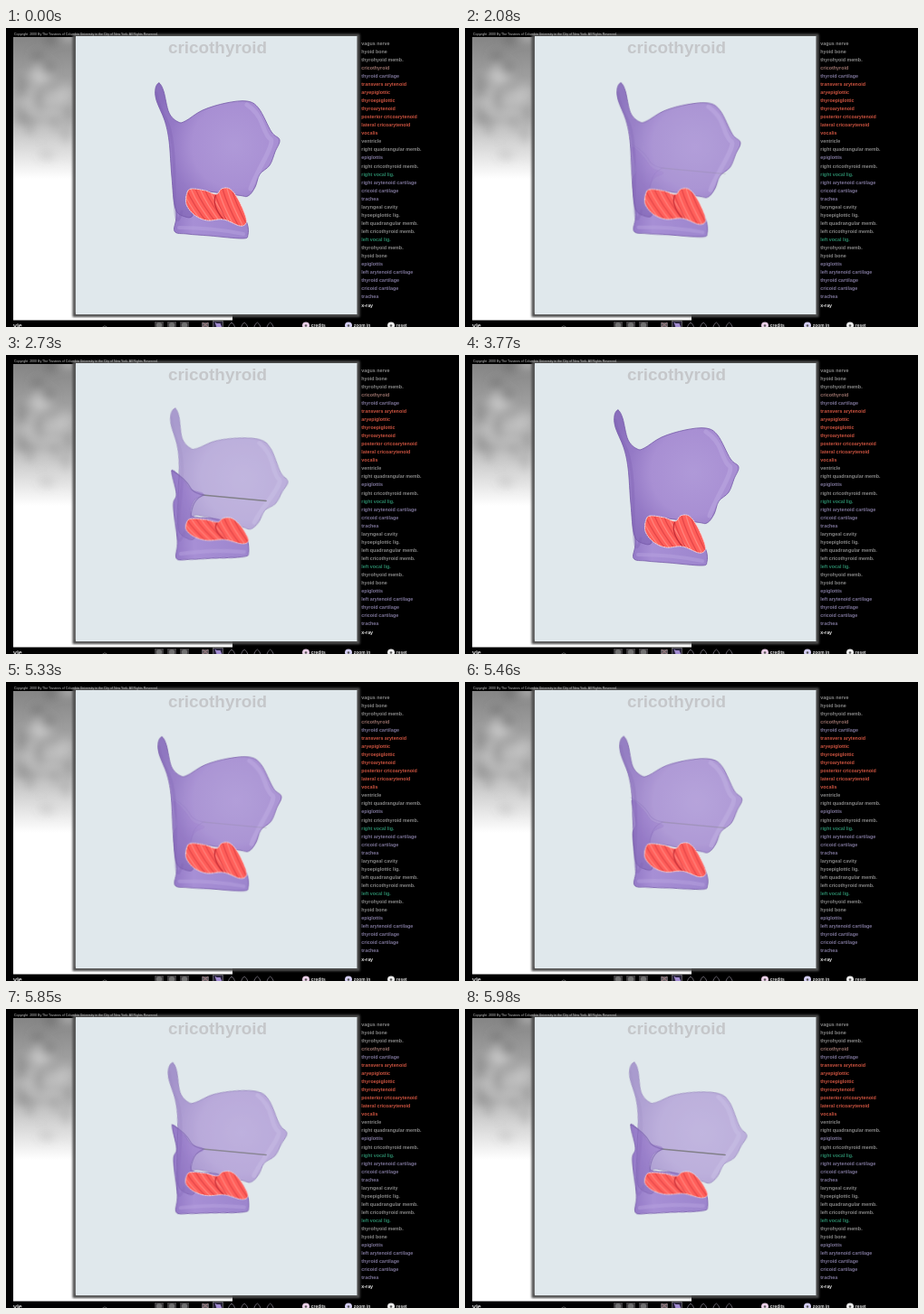
These frames come from a looping animation (500 px wide and 331 px high, 7670 ms). An HTML page:

```html
<!DOCTYPE html>
<html lang="en">
<head>
<meta charset="utf-8">
<title>cricothyroid</title>
<style>
  html, body { margin: 0; width: 100%; height: 100%; overflow: hidden; background: #000; }
  svg { display: block; width: 500px; height: 331px; }
  text { font-family: "Liberation Sans", Arial, sans-serif; font-weight: bold; white-space: pre; }
  #larynx { fill: none; stroke-linejoin: round; stroke-linecap: round; }

  .turn { animation: turn 7670ms infinite; }
  #ring { --to: matrix(.983, -.134, .044, 1.057, -4.7, 12.1); }
  #plate, #rim { --to: matrix(.982, .1625, -.104, .94, 27.4, -25.6); }
  #plate { --fade: .64; }
  #cord { --start: 0; }
  #muscle { --to: matrix(1.042, -.0115, -.015, .695, -5.7, 59.8); }

  /* turn in six steps, hold, snap back; twice per loop */
  @keyframes turn {
    0%, 49.1525%, 100% { transform: matrix(1, 0, 0, 1, 0, 0); opacity: var(--start, 1); }
    27.1186%, 69.4915% {
      transform: matrix(1, 0, 0, 1, 0, 0); opacity: var(--start, 1);
      animation-timing-function: steps(6, start);
    }
    37.288%, 79.661% {
      transform: var(--to, matrix(1, 0, 0, 1, 0, 0)); opacity: var(--fade, 1);
      animation-timing-function: step-end;
    }
  }
</style>
</head>
<body>
<svg viewBox="0 0 500 331" xmlns="http://www.w3.org/2000/svg">
  <defs>
    <linearGradient id="film" x2="0" y2="1">
      <stop offset="0" stop-color="#858585"/>
      <stop offset=".3" stop-color="#bcbcbc"/>
      <stop offset=".5" stop-color="#fff"/>
    </linearGradient>
    <radialGradient id="lilac" gradientUnits="userSpaceOnUse" cx="252" cy="130" r="94">
      <stop offset="0" stop-color="#af99d8"/>
      <stop offset=".5" stop-color="#a88fd3"/>
      <stop offset=".75" stop-color="#957ac6"/>
      <stop offset="1" stop-color="#8a6fbd"/>
    </radialGradient>
    <linearGradient id="violet" gradientUnits="userSpaceOnUse" x1="180" x2="268">
      <stop offset="0" stop-color="#8f74c3"/>
      <stop offset=".3" stop-color="#a78fd5"/>
      <stop offset="1" stop-color="#9c85cd"/>
    </linearGradient>
    <filter id="soft" x="-100%" y="-100%" width="300%" height="300%"><feGaussianBlur stdDeviation="5"/></filter>
    <filter id="glow" filterUnits="userSpaceOnUse" x="60" y="0" width="345" height="331"><feGaussianBlur stdDeviation="1.3"/></filter>
    <clipPath id="filmBox"><rect x="8" y="10" width="242" height="313.5"/></clipPath>
    <clipPath id="muscleBox"></clipPath>
  </defs>

  <rect width="500" height="331"/>
  <g clip-path="url(#filmBox)">
    <rect x="8" y="10" width="242" height="314" fill="url(#film)"/>
    <g id="clouds" filter="url(#soft)"></g>
  </g>
  <rect x="75.5" y="8.5" width="313" height="309.5" fill="none" stroke="#505050" stroke-width="4" filter="url(#glow)"/>
  <rect x="77" y="9" width="310.5" height="308" fill="#e0e8ec"/>

  <text x="9" y="7.6" font-size="3.55" fill="#c8c8c8" style="font-weight:normal">Copyright  2000 By The Trustees of Columbia University in the City of New York. All Rights Reserved.</text>
  <text x="233.5" y="27.5" font-size="18.9" fill="#c5c7ca" text-anchor="middle">cricothyroid</text>

  <g id="larynx">
    <g id="ring" class="turn"></g>
    <g id="plate" class="turn"></g>
    <g id="cord" class="turn">
      <path d="M217 155L287 161.500" stroke="#828089" stroke-width="1.7"/>
      <path d="M183 128Q198 136 205 149Q210 154 219 155Q205 159 204 180" stroke="#8168b3" stroke-width="1.2" opacity=".7"/>
    </g>
    <g id="muscle" class="turn"></g>
  </g>
  <g id="list" font-size="5.35"></g>
  <g id="bar"></g>
</svg>

<script>
const NS = "http://www.w3.org/2000/svg";

function add(parent, tag, attrs, text) {
  const el = document.createElementNS(NS, tag);
  for (const k in attrs) el.setAttribute(k, attrs[k]);
  if (text) el.textContent = text;
  document.getElementById(parent).append(el);
}

// Closed smooth curve through "x,y x,y ..." points
function blob(str) {
  const p = str.split(" ").map(s => s.split(",").map(Number));
  const n = p.length;
  return p.reduce((d, b, i) => {
    const a = p[(i + n - 1) % n], c = p[(i + 1) % n], e = p[(i + 2) % n];
    const ends = [0, 1].map(k => [b[k] + (c[k] - a[k]) / 6, c[k] - (e[k] - b[k]) / 6]);
    return `${d}C${ends[0][0]} ${ends[1][0]} ${ends[0][1]} ${ends[1][1]} ${c}`;
  }, `M${p[0]}`) + "Z";
}

// X-ray mottling
let seed = 7;
const rand = () => (seed = seed * 16807 % 2147483647) / 2147483647;
for (let i = 0; i < 26; i++) {
  const y = 10 + rand() * 135;
  add("clouds", "ellipse", {
    cx: 8 + rand() * 66, cy: y, rx: 5 + rand() * 8, ry: 4 + rand() * 9,
    fill: rand() < .5 ? "#6a6a6a" : "#ddd", opacity: .5 - y / 400
  });
}

// Cricoid with arytenoid
add("ring", "path", {
  d: blob("185,133 198,145 206,156 219,162 208,168 205,183 230,189 256,199 266,216 267,229 261,233 225,230 200,228 186,225 188,207 185,170 189,158"),
  fill: "url(#violet)", stroke: "#765ba8", "stroke-width": .8
});
add("ring", "path", { d: "M191 221Q228 221 262 228", stroke: "#bba9e0", "stroke-width": 4, opacity: .4 });

// Thyroid cartilage
add("plate", "path", {
  d: blob("169,61 165,67 166,80 175,102 180,125 183,165 187,200 198,209 206,207 202,188 208,180 255,185 267,186 275,176 280,162 291,152 297,137 302,124 293,115 279,89 266,81 243,83 217,91 198,103 190,104 180,94 174,70"),
  fill: "url(#lilac)", stroke: "#7357a6", "stroke-width": .8
});
add("plate", "path", { d: "M166 72Q168 86 177 102T186 175T194 203", stroke: "#7a5fb0", "stroke-width": 3, opacity: .3 });
add("plate", "path", { d: "M266 85Q278 93 283 107T292 123T284 148T270 178", stroke: "#c6b6e8", "stroke-width": 5, opacity: .35 });

// Muscle: two bellies of slanted fibres
const belly = blob("200,182 205,178 220,180 232,184 238,178 247,178 256,189 264,207 265,216 258,219 240,212 222,213 208,207 199,195");
add("muscleBox", "path", { d: belly });
add("muscle", "path", { d: belly, fill: "#ff5f5a" });
add("muscle", "g", { id: "fibres", "clip-path": "url(#muscleBox)", "stroke-width": 1.2 });
for (let i = 0; i < 14; i++) {
  const x = 189 + i * 5;
  const lean = i < 8 ? 25 : 17;
  add("fibres", "path", {
    d: `M${x} 178q${lean * .3} 18 ${lean} 40`,
    stroke: i % 2 ? "#ff9088" : "#dd3c42", opacity: .75
  });
}
add("fibres", "path", { d: "M232 184Q226 195 240 212", stroke: "#c42c36" });
add("muscle", "path", { d: belly, stroke: "#f5e3e6", "stroke-width": .9, "stroke-dasharray": "1.4 1.2" });

// Structure list
const tone = { g: "#858585", p: "#7c7498", r: "#c9523f", d: "#98706a", v: "#2a8667", w: "#e4e4e4" };
const items = `g vagus nerve|g hyoid bone|g thyrohyoid memb.|d cricothyroid|p thyroid cartilage
|r transvers arytenoid|r aryepiglottic|r thyroepiglottic|r thyroarytenoid|r posterior cricoarytenoid
|r lateral cricoarytenoid|r vocalis|g ventricle|g right quadrangular memb.|p epiglottis
|g right cricothyroid memb.|v right vocal lig.|p right arytenoid cartilage|p cricoid cartilage|p trachea
|g laryngeal cavity|g hyoepiglottic lig.|g left quadrangular memb.|g left cricothyroid memb.|v left vocal lig.
|g thyrohyoid memb.|g hyoid bone|p epiglottis|p left arytenoid cartilage|p thyroid cartilage
|p cricoid cartilage|p trachea|w x-ray`.split("|");
items.forEach((s, i) => add("list", "text",
  { x: 392.3, y: 18.6 + i * 9.06, fill: tone[s[0]] }, s.slice(2).trim()));

// Bottom bar
add("bar", "text", { x: 8, y: 332, "font-size": 7, fill: "#ddd" }, "vie");
add("bar", "path", { d: "M106.5 331q2.5-2.5 5 0", fill: "none", stroke: "#777", "stroke-width": .7 });
for (let i = 0; i < 3; i++) {
  const x = 169 + i * 14;
  add("bar", "rect", { x: x - 5, y: 325, width: 10, height: 6, fill: "#3c3a3c" });
  add("bar", "ellipse", { cx: x, cy: 329, rx: 3.2, ry: 3, fill: "#707070" });
}
add("bar", "rect", { x: 216, y: 326, width: 8, height: 5, fill: "#605c62" });
add("bar", "path", { d: "M217 326l6 5M223 326l-6 5", stroke: "#a07c80" });
add("bar", "rect", { x: 228.5, y: 324.5, width: 11, height: 8, fill: "#28233a", stroke: "#777", "stroke-width": .7 });
add("bar", "path", { d: "M230.5 325.5l2 1.5h4l2 4.5h-6z", fill: "#a18bd0" });
for (let x = 249; x < 292; x += 14.2)
  add("bar", "path", { d: `M${x - 3.5} 331q.5-3 3.5-5q3 2 3.5 5`, fill: "none", stroke: "#66626c" });
["credits", "zoom in", "reset"].forEach((label, i) => {
  const x = 331 + i * 47;
  add("bar", "circle", { cx: x, cy: 329.5, r: 4, fill: ["#e9cfe6", "#d3cdf0", "#eee"][i] });
  add("bar", "circle", { cx: x, cy: 329.5, r: 1.2, fill: "#555" });
  add("bar", "text", { x: x + 5.8, y: 331, "font-size": 4.9, fill: "#d8d8d8" }, label);
});
</script>
</body>
</html>
```
